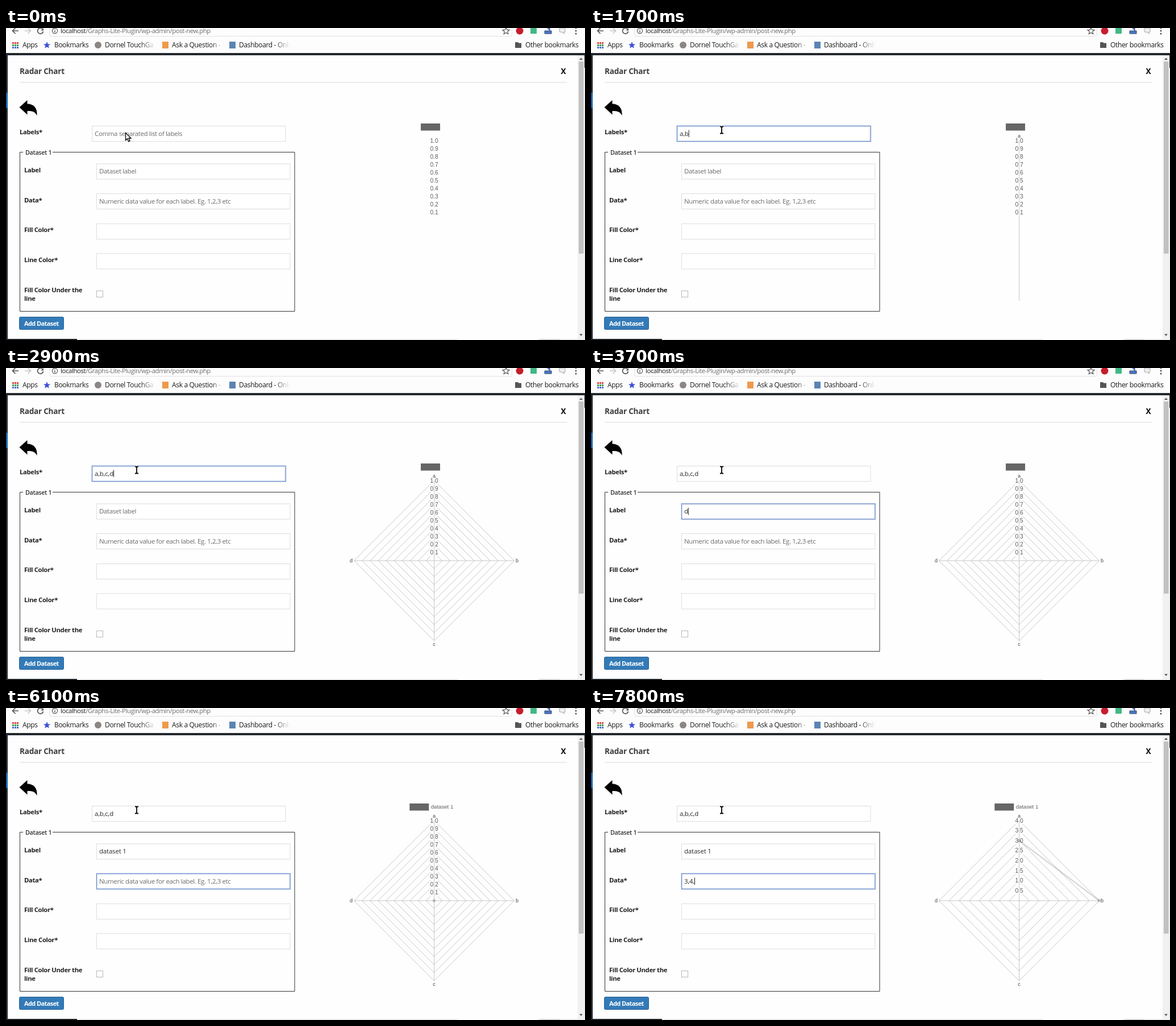
Recreate the animation shown at these times as an HTML page. Size 1019x549 px, loop 8 s.

```html
<!DOCTYPE html>
<html lang="en">
<head>
<meta charset="utf-8">
<title>Radar Chart</title>
<style>
  html, body { margin: 0; width: 100%; height: 100%; overflow: hidden; background: #fefefe; }
  svg { display: block; width: 1019px; height: 549px; }
  text { font-family: "Open Sans", "Noto Sans", sans-serif; white-space: pre; }
  .bar text { font-size: 12px; letter-spacing: -.33px; fill: #1c1c1c; }
  .bar .url { font-size: 11.4px; letter-spacing: -.4px; }
  .bold text { font-size: 11.3px; letter-spacing: -.35px; font-weight: 700; fill: #222; }
  .bold .title { font-size: 13.6px; letter-spacing: -.25px; fill: #3c3c3c; }
  .bold .legend { font-size: 10.8px; font-weight: 600; fill: #333; }
  .bold .button { font-size: 11px; letter-spacing: -.6px; fill: #fff; }
  .field text { font-size: 11.5px; letter-spacing: -.2px; fill: #2a2a2a; }
  .field .hint { letter-spacing: -.37px; fill: #6c6c6c; }
  .box { fill: #fff; stroke: #ddd; }
  .ring { fill: none; stroke: #6a8ccc; }
  .caret { fill: #222; }
  .wave { fill: none; stroke: #e04848; stroke-dasharray: 2 1; }
  #chart text { font-family: "Liberation Sans", Arial, sans-serif; font-size: 9.6px; fill: #5c5c5c; }
  #chart .tick { font-size: 10.2px; }
  #chart .name { font-size: 9px; fill: #444; }
  .grid { fill: none; stroke: #c6c6c6; }
  .line { stroke: #000; stroke-opacity: .14; stroke-width: 2.6; }
  .dot { fill: #000; fill-opacity: .15; stroke: #000; stroke-opacity: .12; }
</style>
</head>
<body>
<svg viewBox="0 0 1019 549">
  <defs>
    <linearGradient id="fade">
      <stop offset="0" stop-color="#fdfdfd" stop-opacity="0"/>
      <stop offset="1" stop-color="#fdfdfd"/>
    </linearGradient>
  </defs>

  <!-- browser bar -->
  <g class="bar">
    <rect width="1019" height="44" fill="#fdfdfd"/>
    <path d="M76.500 0V12Q76.500 14.500 79 14.500H888Q890.500 14.500 890.500 12V0" fill="none" stroke="#e2e2e2"/>
    <g fill="none" stroke="#555" stroke-width="1.7">
      <path d="M22 5H11.500M16.500 0L11.500 5L16.500 10"/>
      <path d="M33 5H43.500M38.500 0L43.500 5L38.500 10" stroke="#c8c8c8"/>
      <path d="M64 1.500A5 5 0 1 0 65.500 6"/>
      <circle cx="86" cy="5" r="4.600" stroke-width="1.200"/>
      <path d="M86 4V8M86 2V3" stroke-width="1.300"/>
      <path d="M880 -1L881.700 3.200L886 3.500L882.700 6.300L883.800 10.500L880 8.200L876.200 10.500L877.300 6.300L874 3.500L878.300 3.200Z" stroke-width="1.200"/>
    </g>
    <path d="M66 0V4.500H61.500Z" fill="#555"/>
    <text class="url" x="96" y="9">localhost<tspan fill="#6c6c6c">/Graphs-Lite-Plugin/wp-admin/post-new.php</tspan></text>
    <circle cx="904" cy="5" r="6.500" fill="#c51d2a"/>
    <rect x="923" y="-1" width="11" height="11" fill="#41b883"/>
    <path d="M951 -1H957V5H948V10H960V5H957" fill="#4a76c9" stroke="#34466e"/>
    <path d="M974 0H984V7H981L983 10L977 7H974Z" fill="#eee" stroke="#aaa"/>
    <g fill="#555"><circle cx="1003" cy="0" r="1.500"/><circle cx="1003" cy="5" r="1.500"/><circle cx="1003" cy="10" r="1.500"/></g>

    <g id="apps"></g>
    <text x="29" y="34">Apps</text>
    <path d="M72 24L73.700 28.200L78 28.500L74.700 31.300L75.800 35.500L72 33.200L68.200 35.500L69.300 31.300L66 28.500L70.300 28.200Z" fill="#3f51d8"/>
    <text x="85" y="34">Bookmarks</text>
    <circle cx="162" cy="30" r="6" fill="#8b8684"/>
    <text x="174" y="34">Dornel TouchGa</text>
    <rect x="275" y="24" width="11" height="12" fill="#ee9a4d"/>
    <text x="292" y="34">Ask a Question -</text>
    <rect x="393" y="24" width="11" height="12" fill="#5b84b4"/>
    <text x="410" y="34">Dashboard - Onli</text>
    <rect x="236" y="20" width="27" height="20" fill="url(#fade)"/>
    <rect x="362" y="20" width="20" height="20" fill="url(#fade)"/>
    <rect x="472" y="20" width="28" height="20" fill="url(#fade)"/>
    <path d="M896 25H901L902.500 26.500H907V35H896Z" fill="#555"/>
    <text x="914" y="34">Other bookmarks</text>
  </g>

  <!-- page behind the dialog -->
  <rect y="44" width="1019" height="505" fill="#23282d"/>
  <rect y="114" width="3" height="27" fill="#1565b0"/>
  <rect x="125" y="547" width="894" height="2" fill="#eee"/>
  <rect x="795" y="547" width="140" height="2" fill="#fff"/>
  <rect x="940" y="547" width="34" height="2" fill="#dcdcdc"/>
  <rect x="1018" y="70" width="1" height="479" fill="#eee"/>
  <rect x="3" y="48" width="1015" height="499" fill="#fefefe"/>
  <rect x="1006" y="48" width="12" height="499" fill="#f1f1f1"/>
  <rect x="1008" y="59" width="8.500" height="338" fill="#c1c1c1"/>
  <path d="M1009 56L1012 52.500L1015 56ZM1009 538.500L1012 542L1015 538.500Z" fill="#555"/>

  <!-- form -->
  <path d="M24 95.500H987" stroke="#ddd"/>
  <path d="M23.500 139.500L37.500 127V133.500C49 133.500 55.500 141 54.500 154C51 147.500 47 146 37.500 146V152.500Z" fill="#000"/>
  <path d="M30 218.500H24.500V498.500H508V218.500H82" fill="none" stroke="#333"/>
  <rect x="159.500" y="462.500" width="11" height="11" fill="#fff" stroke="#b4b9be"/>
  <rect x="23.500" y="508.500" width="78" height="22" rx="2" fill="#337ab7" stroke="#2a659a"/>
  <g class="bold">
    <text class="title" x="24" y="81">Radar Chart</text>
    <text x="976.500" y="80.500" style="font-size:13.500px;fill:#000">X</text>
    <text x="24" y="187">Labels*</text>
    <text class="legend" x="34" y="223">Dataset 1</text>
    <text x="32" y="254">Label</text>
    <text x="32" y="306.500">Data*</text>
    <text x="32" y="359">Fill Color*</text>
    <text x="32" y="412">Line Color*</text>
    <text x="32" y="464.500">Fill Color Under the</text>
    <text x="32" y="479.500">line</text>
    <text class="button" x="32" y="523.500">Add Dataset</text>
  </g>
  <g id="fields"></g>
  <g id="chart"></g>

  <path id="arrow" d="M0 0V13L3 10.200L5.200 15.300L7.600 14.200L5.400 9.500H9.500Z" fill="#fff" stroke="#000" stroke-width="1.300" transform="translate(210.500 184.500)"/>
  <g id="beam" fill="none">
    <path d="M-3 -6H3M0 -6V6M-3 6H3" stroke="#fff" stroke-width="3.500"/>
    <path d="M-3 -6H-1L0 -5L1 -6H3M0 -5V5M-3 6H-1L0 5L1 6H3" stroke="#000" stroke-width="1.800"/>
  </g>
</svg>
<script>
const LOOP = 8000;
const $ = id => document.getElementById(id);
const clamp = v => Math.min(1, Math.max(0, v));
const easeOut = v => 1 - (1 - clamp(v)) ** 4;
const latest = (steps, t) => steps.reduce((v, [at, next]) => t >= at ? next : v, steps[0][1]);

["#d9463f", "#3f9a57", "#4a6fd0"].forEach((colour, row) => {
  for (let col = 0; col < 3; col++)
    $("apps").innerHTML += `<rect x="${11 + col * 4}" y="${25 + row * 4}" width="3" height="3" fill="${colour}"/>`;
});

const fields = [
  { x: 151.5, y: 172.5, hint: "Comma separated list of labels", from: 300, to: 3000,
    typed: [[0, ""], [1000, "a"], [1400, "a,"], [1700, "a,b"], [1900, "a,b,"],
            [2100, "a,b,c"], [2400, "a,b,c,"], [2600, "a,b,c,d"]] },
  { x: 159.5, y: 239, hint: "Dataset label", from: 3000, to: 5500,
    typed: [[0, ""], [3700, "d"], [3900, "da"], [4100, "dat"], [4200, "data"], [4400, "datas"],
            [4600, "datase"], [4700, "dataset"], [4800, "dataset "], [5200, "dataset 1"]] },
  { x: 159.5, y: 291.5, hint: "Numeric data value for each label. Eg. 1,2,3 etc", from: 5500, to: Infinity,
    typed: [[0, ""], [7100, "3"], [7300, "3,"], [7500, "3,4"], [7700, "3,4,"]] },
  { x: 159.5, y: 344.5 },
  { x: 159.5, y: 397 }
];

for (const f of fields) {
  const g = document.createElementNS("http://www.w3.org/2000/svg", "g");
  const box = `x="${f.x}" y="${f.y}" width="340.5" height="27"`;
  g.setAttribute("class", "field");
  g.innerHTML = `<rect class="box" ${box}/>
    <g class="ring"><rect ${box} stroke-width="3" stroke-opacity=".25"/><rect ${box}/></g>
    <text x="${f.x + 4.5}" y="${f.y + 17}"></text>
    <path class="wave" d="M${f.x + 4.5} ${f.y + 19.5}h38"/>
    <rect class="caret" y="${f.y + 7}" width="1" height="12.5"/>`;
  $("fields").append(g);
  [, f.ring, f.text, f.wave, f.caret] = g.children;
}

function drawField(f, t) {
  const value = f.typed ? latest(f.typed, t) : "";
  const active = t >= f.from && t < f.to;
  const glow = t < f.from || !f.typed ? 0
    : t < f.to ? clamp(.5 + (t - f.from) / 200) : clamp(.5 - (t - f.to) / 200);
  const shown = value || f.hint || "";
  if (f.text.textContent !== shown) f.text.textContent = shown;
  f.text.setAttribute("class", value ? "" : "hint");
  f.ring.style.opacity = glow;
  f.wave.style.display = active && value.includes(" ") ? "" : "none";
  f.caret.style.display = active && !(t >= 6100 && t < 6700) ? "" : "none";
  f.caret.setAttribute("x", f.x + 4 + (value ? f.text.getComputedTextLength() + .5 : 0));
}

const CX = 753.5, CY = 339, R = 141;
const names = [[0, ""], [1200, "a"], [1700, "a,"], [1900, "a,b"], [2200, "a,b,"],
               [2400, "a,b,c"], [2700, "a,b,c,"], [2900, "a,b,c,d"]];
const legend = [[0, ""], [3900, "da"], [4200, "data"], [4600, "datas"], [4700, "datase"],
                [4800, "dataset"], [5000, "dataset "], [5300, "dataset 1"]];
const scale = [[0, [10, .1]], [7300, [6, .5]], [7500, [8, .5]]];

const pen = document.createElement("canvas").getContext("2d");
pen.font = '9.6px "Liberation Sans", Arial, sans-serif';

function polar(i, n, r) {
  const a = 2 * Math.PI * i / n;
  return [CX + r * Math.sin(a), CY - r * Math.cos(a)];
}

function pointName(name, i, n) {
  const [x, y] = polar(i, n, 143.5);
  const side = x - CX, drop = y - CY;
  const anchor = Math.abs(side) < 1 ? "middle" : side > 0 ? "start" : "end";
  const shift = Math.abs(drop) < 1 ? 2.5 : drop > 0 ? 6.5 : -2.5;
  return `<text class="name" x="${x}" y="${y + shift}" text-anchor="${anchor}">${name}</text>`;
}

function dataPoints(t) {
  if (t < 5700) return [];
  if (t < 7500) return [easeOut((t - 7300) / 200)];
  const p = easeOut((t - 7500) / 300);
  return [1 - .25 * p, p];
}

function chart(t) {
  const list = latest(names, t);
  const labels = list ? list.split(",") : [];
  const n = labels.length;
  const title = latest(legend, t);
  const half = pen.measureText(title).width / 2;
  const [count, step] = latest(scale, t);
  let out = `<rect x="${730 - half}" y="168" width="34" height="12.5" fill="#666"/>
    <text x="${767.5 - half}" y="177.3">${title}</text>`;
  for (let k = 1; k <= count; k++) {
    const r = R * k / count;
    if (n) out += `<polygon class="grid" points="${labels.map((_, i) => polar(i, n, r)).join(" ")}"/>`;
    out += `<rect x="${CX - 8.5}" y="${CY - r - 6.5}" width="17" height="13" fill="#fff" fill-opacity=".75"/>
      <text class="tick" x="${CX}" y="${CY - r + 3.5}" text-anchor="middle">${(k * step).toFixed(1)}</text>`;
  }
  labels.forEach((name, i) => {
    const [x, y] = polar(i, n, R);
    out += `<path class="grid" d="M${CX} ${CY}L${x} ${y}"/>` + pointName(name, i, n);
  });
  const points = dataPoints(t).map((v, i) => polar(i, n, R * v));
  if (points.length > 1) out += `<path class="line" d="M${points.join("L")}"/>`;
  for (const [x, y] of points) out += `<circle class="dot" cx="${x}" cy="${y}" r="2.6"/>`;
  return out;
}

let drawn = "";
function frame(now) {
  const t = now % LOOP;
  fields.forEach(f => drawField(f, t));
  const next = chart(t);
  if (next !== drawn) $("chart").innerHTML = drawn = next;
  $("arrow").style.display = t < 700 ? "" : "none";
  $("beam").style.display = t < 700 ? "none" : "";
  $("beam").setAttribute("transform", t < 800 ? "translate(222 182)" : "translate(230 179.5)");
  requestAnimationFrame(frame);
}
frame(performance.now());
</script>
</body>
</html>
```
